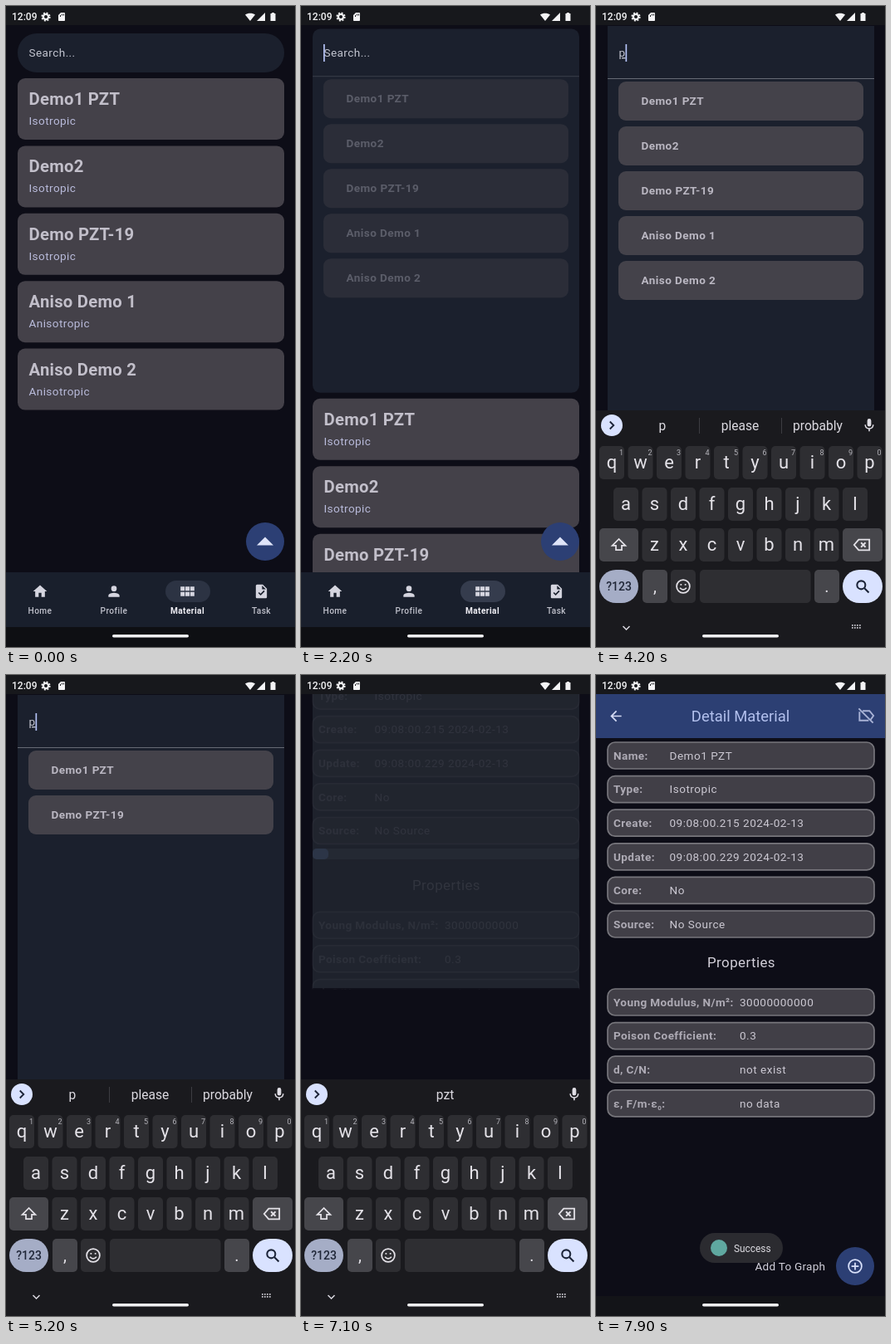
An HTML page that plays this animation: 348 by 772 pixels, repeating every 8 s.

```html
<!DOCTYPE html>
<html lang="en">
<head>
<meta charset="utf-8">
<title>Material search</title>
<style>
  html, body { margin: 0; width: 100%; height: 100%; overflow: hidden; background: #0d0d17; }
  svg { display: block; width: 348px; height: 772px; font-family: Roboto, "Noto Sans", sans-serif; }
  text { white-space: pre; }
</style>
</head>
<body>
<svg id="stage" viewBox="0 0 348 772"></svg>
<script>
const LOOP = 8000;
const stage = document.getElementById('stage');
const $ = id => document.getElementById(id);

// Markup helpers
const text = (x, y, str, size, fill, extra = '') =>
  `<text x="${x}" y="${y}" font-size="${size}" fill="${fill}" ${extra}>${str}</text>`;
const box = (x, y, w, h, r, fill, extra = '') =>
  `<rect x="${x}" y="${y}" width="${w}" height="${h}" rx="${r}" fill="${fill}" ${extra}/>`;
const disc = (x, y, r, fill, extra = '') =>
  `<circle cx="${x}" cy="${y}" r="${r}" fill="${fill}" ${extra}/>`;
const icon = (d, x, y, size, fill, stroke = 0) =>
  `<path d="${d}" transform="translate(${x - size / 2} ${y - size / 2}) scale(${size / 24})" fill-rule="evenodd" ` +
  (stroke ? `fill="none" stroke="${fill}" stroke-width="${stroke}"/>` : `fill="${fill}"/>`);
const group = (id, body, extra = '') => `<g id="${id}" ${extra}>${body}</g>`;
const mid = 'text-anchor="middle" ';
const bold = 'font-weight="700" ';
const gap = n => `letter-spacing="${n}" `;

const ICONS = {
  home: 'M10 20v-6h4v6h5v-8h3L12 3 2 12h3v8z',
  person: 'M12 12a4 4 0 1 0 0-8 4 4 0 0 0 0 8zm0 2c-2.7 0-8 1.3-8 4v2h16v-2c0-2.7-5.3-4-8-4z',
  grid: 'M2 5h6v6H2zM9 5h6v6H9zM16 5h6v6h-6zM2 13h6v6H2zM9 13h6v6H9zM16 13h6v6h-6z',
  task: 'M14 2H6c-1.1 0-2 .9-2 2v16c0 1.1.9 2 2 2h12c1.1 0 2-.9 2-2V8zM11 18l-3.6-3.5 1.4-1.4 2.1 2.1 4.6-4.6 1.4 1.4zM13 3.5V9h5.5z',
  card: 'M18 2h-8L4 8v12c0 1.1.9 2 2 2h12c1.1 0 2-.9 2-2V4c0-1.1-.9-2-2-2zM8 8h2v4H8zM12 5h2v4h-2zM16 5h2v4h-2z',
  back: 'M20 11H7.8l5.6-5.6L12 4l-8 8 8 8 1.4-1.4L7.8 13H20z',
  untag: 'M8 6h8.5l5 6-3.5 5M15.5 18H4V7M3 3l18 18',
  mic: 'M12 14a3 3 0 0 0 3-3V5a3 3 0 0 0-6 0v6a3 3 0 0 0 3 3zm5-3a5 5 0 0 1-10 0H5a7 7 0 0 0 6 6.900V21h2v-3.100A7 7 0 0 0 19 11z',
  shift: 'M12 4l-9 9h5v6h8v-6h5z',
  del: 'M8 5h14v14H8l-6-7zM11 9l6 6M17 9l-6 6',
  find: 'M15 15l6 6M16 10a6 6 0 1 1-12 0 6 6 0 0 1 12 0z',
  smile: 'M21 12a9 9 0 1 1-18 0 9 9 0 0 1 18 0zM7.500 14q4.500 5 9 0M8 9.500h2M14 9.500h2',
  right: 'M9 6l6 6-6 6',
  down: 'M6 9l6 6 6-6',
  plus: 'M21 12a9 9 0 1 1-18 0 9 9 0 0 1 18 0zM12 7v10M7 12h10'
};

const materials = [
  ['Demo1 PZT', 'Isotropic'], ['Demo2', 'Isotropic'], ['Demo PZT-19', 'Isotropic'],
  ['Aniso Demo 1', 'Anisotropic'], ['Aniso Demo 2', 'Anisotropic']
];
const fields = [
  ['Name:', 'Demo1 PZT'], ['Type:', 'Isotropic'], ['Create:', '09:08:00.215 2024-02-13'],
  ['Update:', '09:08:00.229 2024-02-13'], ['Core:', 'No'], ['Source:', 'No Source']
];
const props = [
  ['Young Modulus, N/m²:', '30000000000'], ['Poison Coefficient:', '0.3'], ['d, C/N:', 'not exist'],
  ['ε, F/m·ε<tspan dy="3" font-size="8">0</tspan><tspan dy="-3">:</tspan>', 'no data']
];

function cards() {
  return materials.map(([name, kind], i) => {
    const y = 87 + 81.4 * i;
    return box(14, y, 321, 74, 9, '#444149') +
      text(27.5, y + 32, name, 20.3, '#c2bfca', bold + gap(.25)) +
      text(27.5, y + 56, kind, 13.55, '#b9bbdb', gap(.42));
  }).join('');
}

function hits() {
  return materials.map(([name], i) => group('hit' + i,
    box(27, 0, 295, 47, 9, '#44424a') +
    text(54.500, 28, name, 13.55, '#bab7c2', bold + gap(.42)))).join('');
}

function navBar() {
  const tabs = [['home', 'Home', 41], ['person', 'Profile', 130], ['grid', 'Material', 218.500], ['task', 'Task', 307.500]];
  return box(0, 682, 348, 67, 0, '#191f2c') + box(0, 748, 348, 24, 0, '#0e0f13') +
    box(192, 692, 54, 26, 13, '#353c4d', 'id="pill"') +
    tabs.map(([key, label, x], i) => icon(ICONS[key], x, 705, 20, '#d5d5df') +
      text(x, 732, label, 10.16, i == 2 ? '#f0eff5' : '#c0c1cb', mid + gap(.42) + `font-weight="${i == 2 ? 700 : 500}"`)).join('');
}

function rows(list, top, valueX) {
  return list.map(([label, value], i) => {
    const y = top + 40.6 * i;
    return box(14, y - 16, 321, 32, 9, '#413f47', 'stroke="#77767c" stroke-width="1.7"') +
      text(21, y + 4.700, label, 13.55, '#aeabb5', bold + gap(.4)) +
      text(valueX, y + 4.700, value, 13.55, '#cbc8d2', gap(.5));
  }).join('');
}

function detail() {
  return group('fields', rows(fields, 97, 88.500)) +
    text(175, 352, 'Properties', 16.9, '#d3d0da', mid + gap(.42)) +
    rows(props, 394, 173) +
    group('spinner', `<circle cx="175" cy="68.500" r="8" fill="none" stroke="#c5cbe4" stroke-width="2"/>`) +
    box(0, 16, 348, 60, 0, '#2c3f73') +
    icon(ICONS.back, 24, 49.500, 20, '#d6dcf5') +
    text(174, 56, 'Detail Material', 18.4, '#b3c1ee', mid) +
    icon(ICONS.untag, 325, 49, 23, '#a9b3d6', 2);
}

function keyboard() {
  const key = (ch, i, x, y) => box(x - 15, y, 30, 40, 5, '#2e2e32', `id="key-${ch}"`) +
    text(x, y + 26.500, ch, 22, '#e4e2e8', mid) +
    (y == 530 ? text(x + 11.500, y + 11, (i + 1) % 10, 9, '#b5b4bb', mid) : '');
  const line = (chars, x0, y) => [...chars].map((ch, i) => key(ch, i, x0 + 34.5 * i, y)).join('');
  const word = (id, x) => text(x, 511, '', 15.6, '#dcdae1', mid + `id="${id}"`);
  let dots = '';
  for (let i = 0; i < 8; i++) dots += box(308 + i % 4 * 3, 745 + (i >> 2) * 3, 1.7, 1.7, 0, '#c9c8cf');
  return box(0, 487, 348, 285, 0, '#1a1a1e') +
    disc(19, 505, 13, '#d9e2ff') + icon(ICONS.right, 19, 505, 18, '#1c2438', 2.5) +
    word('word0', 80) + word('word1', 173.500) + word('word2', 267) +
    group('bars', box(124, 496, 1, 19, 0, '#3c3c41') + box(223, 496, 1, 19, 0, '#3c3c41')) +
    icon(ICONS.mic, 329, 505, 19, '#e0dee5') +
    line('qwertyuiop', 19, 530) + line('asdfghjkl', 36, 580) + line('zxcvbnm', 70.500, 629) +
    box(4, 629, 47, 40, 5, '#46464b') + icon(ICONS.shift, 27.500, 649, 21, '#e4e2e8', 2) +
    box(297, 629, 48, 40, 5, '#46464b') + icon(ICONS.del, 320, 649, 22, '#e4e2e8', 2) +
    box(4, 679, 47, 40, 20, '#a5adc6') + text(27.500, 704, '?123', 14, '#202738', mid + 'font-weight="500"') +
    box(56, 679, 30, 40, 5, '#46464b') + text(71, 706, ',', 20, '#e4e2e8', mid) +
    box(90, 679, 30, 40, 5, '#2e2e32') + icon(ICONS.smile, 105, 699, 21, '#e4e2e8', 2) +
    box(125, 679, 133.500, 40, 5, '#2e2e32') +
    box(263, 679, 30, 40, 5, '#46464b') + text(278, 706, '.', 20, '#e4e2e8', mid) +
    box(297, 679, 48, 40, 20, '#d9e2ff') + icon(ICONS.find, 321, 699, 20, '#1c2438', 2.5) +
    icon(ICONS.down, 36.500, 749, 16, '#dcdae1', 2.2) + dots;
}

function statusBar() {
  const white = '#f3f3f5';
  return box(0, 0, 348, 23, 0, '#17181c') +
    text(7, 17, '12:09', 12, white, 'font-weight="500"') +
    `<circle cx="48" cy="13" r="3.100" fill="none" stroke="${white}" stroke-width="2.200"/>` +
    `<circle cx="48" cy="13" r="4.800" fill="none" stroke="${white}" stroke-width="1.600" stroke-dasharray="2 1.770"/>` +
    icon(ICONS.card, 67, 13, 12, white) +
    icon('M12 22L0 7C6 2 18 2 24 7z', 294, 13, 12, white) +
    icon('M2 22h20V2z', 307, 13, 12, white) +
    icon('M9 2h6v2h3v18H6V4h3z', 321.500, 13, 12, white);
}

const fab = '#2c3f74';
stage.innerHTML =
  '<clipPath id="reveal"><rect id="revealBox" width="348" height="772"/></clipPath>' +
  box(0, 0, 348, 772, 0, '#0d0d17') +
  group('main',
    group('cards', cards()) +
    box(14, 33, 321, 47, 23, '#1b202d', 'id="panel"') +
    group('results', box(14, 87, 321, 1, 0, '#666a74', 'id="rule"') + hits()) +
    text(27.500, 61, '', 13.55, '#c3c5d0', 'id="query" ' + gap(.42)) +
    box(27, 46, 1.7, 21, 0, '#b4c2f5', 'id="caret"') +
    disc(312, 645, 23, fab) + '<path d="M302 649.500L312 639.500 322 649.500z" fill="#dfe4f8"/>' +
    navBar()) +
  group('ghost', box(14, 23, 321, 354, 0, '#1e222c') + box(14, 209, 321, 13, 4, '#242933') +
    box(14, 209, 19, 13, 5, '#2c3547')) +
  group('clip', group('detail', detail()), 'clip-path="url(#reveal)"') +
  group('action', box(0, 748, 348, 24, 0, '#131418') +
    text(191.500, 717, 'Add To Graph', 13.55, '#d3d1dc', gap(.25)) +
    disc(312, 712, 23, fab) + icon(ICONS.plus, 312, 712, 21, '#d9e1fa', 2)) +
  group('keyboard', keyboard()) +
  group('toast', box(125, 672, 100, 36, 18, '#2b2b30') + disc(148, 690, 10, '#5fa8a0') +
    text(166, 694.500, 'Success', 11.9, '#dddce2')) +
  statusBar() + box(128, 757, 92, 3.5, 1.75, '#f4f4f6');

// Linear interpolation through [time, value] steps
function at(t, ...steps) {
  if (t <= steps[0][0]) return steps[0][1];
  for (let i = 1; i < steps.length; i++) {
    const [t0, v0] = steps[i - 1], [t1, v1] = steps[i];
    if (t < t1) return v0 + (v1 - v0) * (t - t0) / (t1 - t0);
  }
  return steps[steps.length - 1][1];
}
const within = (t, ...spans) => spans.some(([a, b]) => t >= a && t < b);
const set = (id, attrs) => { for (const k in attrs) $(id).setAttribute(k, attrs[k]); };
const fade = (id, v) => set(id, { opacity: v, display: v > 0 ? 'inline' : 'none' });
const shift = (id, y) => set(id, { transform: `translate(0 ${y})` });

const typed = [
  { time: 0, query: 'Search...', caret: 27, words: ['', '', ''] },
  { time: 4000, query: 'p', caret: 35.500, words: ['p', 'please', 'probably'] },
  { time: 5500, query: 'pz', caret: 42.500, words: ['pz', 'pizza', 'oz'] },
  { time: 6000, query: 'pzt', caret: 47.500, words: ['', 'pzt', ''] }
];

function draw(t) {
  // Search panel opens and pushes the cards down
  const open = 1 - (1 - at(t, [1980, 0], [2580, 1])) ** 2;
  const top = 33 - 9 * open, bottom = 80 + 642 * open;
  set('panel', { y: top, height: bottom - top, rx: 23 * (1 - open) });
  shift('cards', bottom - 80);
  shift('results', -7 * (1 - open));
  fade('results', at(t, [2080, 0], [2380, 1]));
  const filtered = t >= 4700;
  [0, 1, 2, 3, 4].forEach(i => {
    const shown = !filtered || i == 0 || i == 2;
    set('hit' + i, { display: shown ? 'inline' : 'none' });
    shift('hit' + i, 91 + 54 * (filtered && i == 2 ? 1 : i));
  });
  set('pill', { opacity: at(t, [0, .7], [300, 1]) });

  // Typing
  const step = typed.filter(s => t >= s.time).pop();
  const typing = step !== typed[0];
  $('query').textContent = step.query;
  set('query', { 'text-decoration': typing ? 'underline' : 'none' });
  set('caret', { x: step.caret });
  fade('caret', +within(t, [2050, 2900], [3400, 4500], [5000, 5300], [5500, 5900], [6500, 6700]));
  step.words.forEach((w, i) => $('word' + i).textContent = w);
  fade('bars', +(step.words[0] !== ''));
  [['p', 4000], ['z', 5500], ['t', 6000]].forEach(([ch, when]) =>
    set('key-' + ch, { fill: within(t, [when - 80, when + 60]) ? '#505056' : '#2e2e32' }));
  const drop = at(t, [2450, 285], [2700, 0], [7600, 0], [7850, 285]);
  shift('keyboard', drop);
  fade('keyboard', +(drop < 285));

  // Change to the detail screen
  fade('main', at(t, [6720, 1], [6980, 0]));
  fade('ghost', at(t, [6900, 0], [7080, 1], [7130, 1], [7300, 0]));
  fade('detail', at(t, [6980, 0], [7060, .1], [7110, .1], [7350, 1]));
  shift('detail', at(t, [7100, -93], [7250, -40], [7400, -3], [7600, -3], [7700, 0]));
  shift('fields', at(t, [7100, -20], [7250, 0]));
  set('revealBox', { height: at(t, [7100, 377], [7350, 772]) });
  fade('spinner', +(t < 7600));
  fade('action', at(t, [7200, 0], [7350, 1]));
  fade('toast', at(t, [7400, 0], [7500, .4], [7650, 1]));
}

const start = performance.now();
function tick() {
  draw((performance.now() - start) % LOOP);
  requestAnimationFrame(tick);
}
tick();
</script>
</body>
</html>
```
